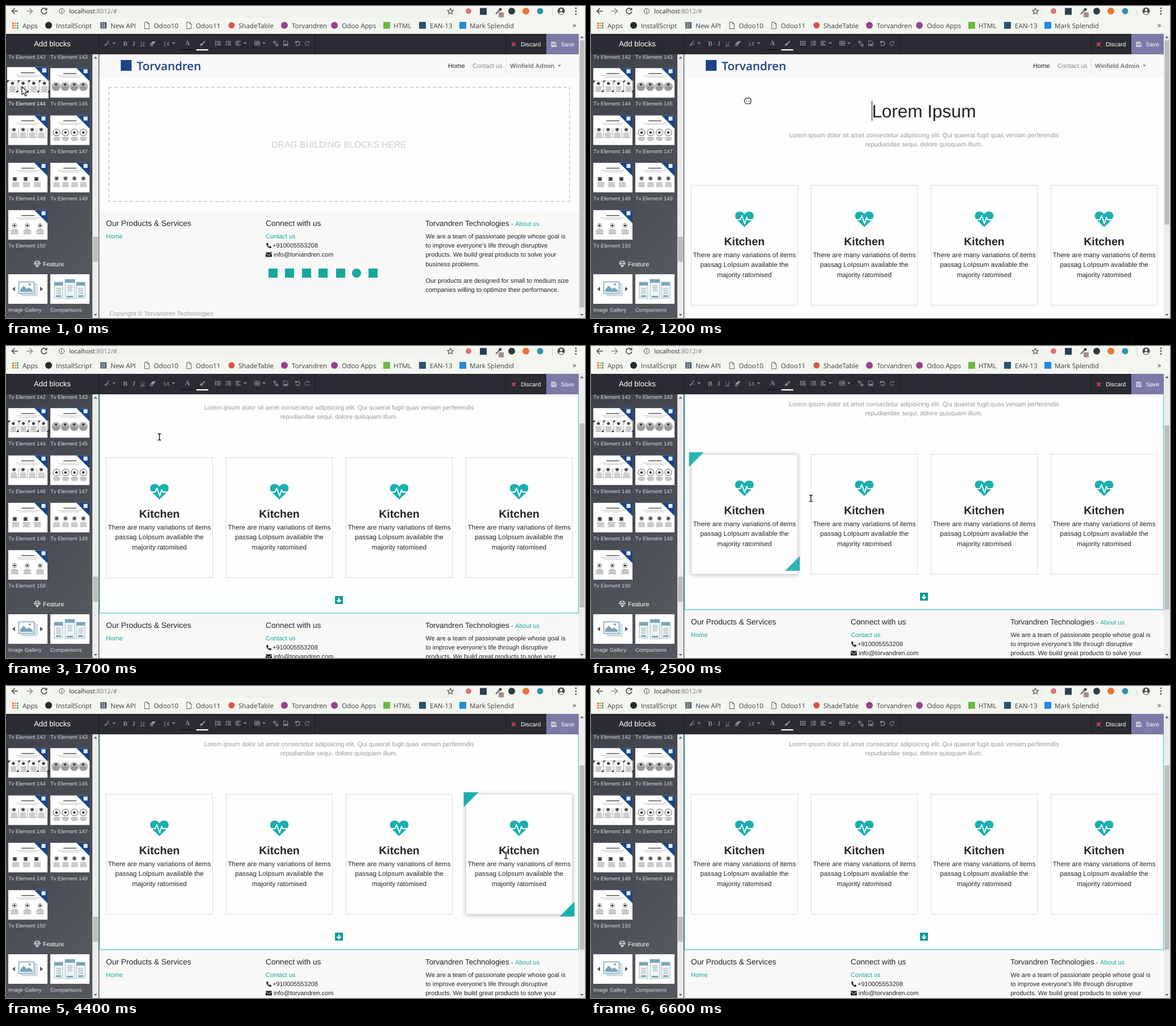
These frames come from a looping animation (1019 by 549 pixels, 6.8 s). An HTML page:

```html
<!DOCTYPE html>
<html lang="en">
<head>
<meta charset="utf-8">
<title>Website builder</title>
<style>
  html, body { margin: 0; width: 100%; height: 100%; overflow: hidden; background: #fefefe; }
  svg { display: block; }
  text { font-family: "Liberation Sans", Arial, sans-serif; white-space: pre; text-rendering: geometricPrecision; }
  .ui { font-family: "Open Sans", "Noto Sans", sans-serif; }
  .serif { font-family: "Liberation Serif", serif; font-weight: bold; }
  .shadow { filter: drop-shadow(0 1px 4px rgba(0, 0, 0, .3)); }
</style>
</head>
<body>
<svg id="stage" width="1019" height="549" viewBox="0 0 1019 549"></svg>
<script>
const LOOP = 6800, STEP = 100;
const TEAL = '#1cafb1', LINK = '#17a79b', NAVY = '#1b4485', INK = '#212529';
const CARD_X = [176.5, 387.5, 598.5, 809.5];

// Drawing helpers
const rect = (x, y, w, h, fill, more = '') =>
  `<rect x="${x}" y="${y}" width="${w}" height="${h}" fill="${fill}" ${more}/>`;
const dot = (x, y, r, fill, more = '') => `<circle cx="${x}" cy="${y}" r="${r}" fill="${fill}" ${more}/>`;
const shape = (d, fill, more = '') => `<path d="${d}" fill="${fill}" ${more}/>`;
const line = (d, color, w = 1, more = '') =>
  `<path d="${d}" fill="none" stroke="${color}" stroke-width="${w}" ${more}/>`;
const text = (x, y, s, size, fill, more = '') =>
  `<text x="${x}" y="${y}" font-size="${size}" fill="${fill}" ${more}>${s}</text>`;
const mid = 'text-anchor="middle"', bold = 'font-weight="bold"';
const group = (id, body, more = '') => `<g id="${id}" ${more}>${body}</g>`;
const caret = (x, y, fill, s = 3) => shape(`M${x - s} ${y}h${2 * s}l${-s} ${s}z`, fill);
const bars = (x, y, widths, gap, color, w = 1) =>
  widths.map((n, i) => line(`M${x - n / 2} ${y + i * gap}h${n}`, color, w)).join('');

function browser() {
  const g = '#4b4e52';
  let s = rect(0, 0, 1019, 49, '#f3f5ef') + rect(84, -10, 713, 31, '#f0f3ed', 'rx="14"');
  s += line('M21 9H11M15.5 4L10.5 9l5 5', g, 1.7) + line('M36 9h10M41.5 4l5 5l-5 5', '#8d9093', 1.7);
  s += line('M71 6a5 5 0 1 0 .8 4', g, 1.7) + shape('M72.5 2.5v5h-5z', g);
  s += dot(98, 9, 4.6, 'none', `stroke="${g}"`) + line('M98 8.5v3M98 6v1.3', g, 1.2);
  s += text(111, 13, 'localhost<tspan fill="#777b7f">:8012/#</tspan>', 10.9, '#2a2d30', 'class="ui"');
  s += line('M782 4l1.6 3.4l3.7.4l-2.8 2.5l.8 3.7l-3.3-1.9l-3.3 1.9l.8-3.7l-2.8-2.5l3.7-.4z', g, 1.1);
  s += dot(814, 9, 5, '#d9747a') + rect(834, 3.5, 12, 12, '#2c3e55') + line('M862 14l7-7', '#667', 2.4) +
    dot(870, 6, 2.6, '#444') + rect(867, 11, 9, 9, '#a58d8d', 'rx="1.5"') +
    dot(890, 9, 6, '#2f3b3e') + dot(915, 9, 6, '#ea7430') + dot(940, 9, 5.5, '#2f8fb0');
  s += line('M961.5 2v15', '#d3d5d5') + dot(977, 9, 6.5, g) + dot(977, 7, 2.2, '#f4f5f3') +
    shape('M972.5 12.5q4.5-4 9 0q-4.5 4-9 0z', '#f4f5f3');
  s += [4, 9, 14].map(y => dot(1003, y, 1.4, g)).join('');
  for (let i = 0; i < 9; i++)
    s += rect(11 + i % 3 * 4, 29 + Math.floor(i / 3) * 4, 2.7, 2.7, ['#e2574c', '#e0a52e', '#3c9d5b'][i % 3]);
  const file = x => line(`M${x} 28.5h5l3 3v8.5h-8zM${x + 5} 28.5v3h3`, '#5c6064');
  s += dot(75, 34, 6, '#24292e') + rect(166, 28.5, 11, 11, '#50606c') +
    line('M168 31h3M168 34h3M168 37h3M173 30v8', '#e8ecee') + file(244) + file(318) +
    dot(397, 34, 5.5, '#dd5248') + dot(490, 34, 6, '#96428d') + dot(578, 34, 6, '#96428d') +
    rect(664, 28, 12, 12, '#6cb944') + rect(727, 28, 12, 12, '#285270') + rect(798, 28, 12, 12, '#228ae0');
  const marks = [[29, 'Apps'], [88, 'InstallScript'], [184, 'New API'], [260, 'Odoo10'], [334, 'Odoo11'],
    [409, 'ShadeTable'], [503, 'Torvandren'], [591, 'Odoo Apps'], [682, 'HTML'], [746, 'EAN-13'], [816, 'Mark Splendid']];
  s += marks.map(([x, n]) => text(x, 38.5, n, 11.6, '#3c4043', 'class="ui"')).join('');
  return s + text(997, 38, '»', 13, '#3c4043', 'class="ui"');
}

function toolbar() {
  const c = '#8d8d93';
  let s = rect(0, 49, 1008, 36, '#2b2b33') + line('M163.5 49v36M543.5 49v36M880.5 49v36', '#1d1d24');
  s += text(81.5, 71, 'Add blocks', 13.3, '#fff', mid);
  s += line('M174 70l5-5', c, 2) + line('M180 61v3M178.5 62.5h3M182 66v2.5', c);
  s += [190, 295, 421, 454].map(x => caret(x, 64, c)).join('');
  s += text(206, 69.5, 'B', 11.5, c, 'class="serif"') + text(223, 69.5, 'I', 11.5, c, 'class="serif" font-style="italic"') +
    text(237, 69, 'U', 9.5, c) + line('M236 70.5h8', c);
  s += shape('M253 68l5-6h6l-5 6zM253 69h6l-1 1.5h-5z', c) + text(276.5, 69.5, '14', 10, c);
  s += text(315, 69, 'A', 12, c, 'class="serif"') + rect(309, 76, 20, 2, '#18181d');
  s += line('M346 66l4-4', c, 2) + shape('M341 69.5q1-4 4-4l2 2q-1 3-6 2z', c) + rect(335, 76, 21, 2.3, '#fff');
  for (const y of [62.5, 65.5, 68.5]) {
    s += rect(368, y - 1, 2, 2, c) + line(`M371 ${y}h7M390 ${y}h6`, c, 1.6) + line(`M387 ${y}h1.5`, c, 2);
    s += line(`M404 ${y}h${y === 65.5 ? 6 : 9}`, c, 1.6);
  }
  s += line('M437.5 62h9v7h-9zM437.5 65.5h9M440.5 62v7M443.5 62v7', c);
  s += line('M473 66l-2-2a1.5 1.5 0 0 1 2-2l3 3M476 66l2.5 2a1.5 1.5 0 0 1-2 2l-3-3', c, 1.5);
  s += line('M488.5 61.5h5l2.5 2.5v6h-7.5z', c) + shape('M489 69l2-3l1.5 1.5l1.5-2l1.5 3.5z', c);
  s += line('M510.5 63.5a3.6 3.6 0 1 1-.5 4', c, 1.4) + shape('M509 61v4h4z', c);
  s += line('M532.5 63.5a3.6 3.6 0 1 0 .5 4', '#66666d', 1.4) + shape('M534 61v4h-4z', '#66666d');
  s += line('M890.5 64.5l6 6M896.5 64.5l-6 6', '#d6405a', 2.3) + text(906, 71, 'Discard', 10.4, '#fff');
  s += rect(951, 49, 57, 36, '#7b7aa8') + line('M960 63.5h6l2 2v6h-8zM962 63.5v2.5h3.5v-2.5M962 71.5v-3h4v3', '#fff');
  return s + text(976.5, 71, 'Save', 10.3, '#fff');
}

// Miniature layouts, relative to the thumbnail corner
const icons = {
  card: x => line(`M${x - 8} 22.5h16v19h-16z`, '#c4c4c4') + dot(x, 27, 2.6, '#444') +
    shape(`M${x - 9} 22h4l-4 4zM${x + 9} 42h-4l4-4z`, '#222') + bars(x, 33, [11, 9, 12, 8], 2.3, '#888'),
  disc: x => dot(x, 32.5, 8, '#b5b5b5') + dot(x, 29, 2, '#333') + bars(x, 33.5, [11, 12, 9], 2.2, '#777'),
  box: x => line(`M${x - 7.5} 23.5h15v16h-15z`, '#d2d2d2') + dot(x, 25, 3.2, '#777') + dot(x, 25, 1.3, '#222') +
    bars(x, 31, [9, 12, 10, 12], 2.4, '#888'),
  ring: x => dot(x, 30, 6, '#fff', 'stroke="#555"') + dot(x, 30, 2.2, '#222') + bars(x, 39, [11, 13, 9], 2.3, '#777'),
  square: x => rect(x - 4, 25, 7, 7, '#666') + rect(x - 2, 27, 3, 3, '#222') + bars(x + 1, 35, [12, 13, 11, 13], 2.3, '#888'),
  blur: x => dot(x, 27.5, 4, '#aaa') + rect(x - 2, 25.5, 4, 4, '#444') + bars(x, 35, [10, 12, 11, 12], 2.3, '#888'),
  eye: x => dot(x, 27, 3.8, '#fff', 'stroke="#888"') + dot(x, 27, 1.8, '#111') + bars(x, 34, [9, 14, 12, 14], 2.5, '#777')
};
const kinds = [['card', 9, 17.7, 4], ['disc', 10, 16, 4], ['box', 10, 16, 4], ['ring', 11, 15.7, 4],
  ['square', 12, 19, 3], ['blur', 11, 15.7, 4], ['eye', 11, 22.5, 3]];

function thumb(i) {
  const [kind, x0, gap, n] = kinds[i];
  let s = rect(0, 0, 69, 52, '#fff') + bars(34.5, 9.5, [23], 0, '#555', 1.5) + bars(34.5, 13.5, [42, 32], 2.5, '#c2c2c2');
  for (let k = 0; k < n; k++) s += icons[kind](x0 + gap * k);
  return s + shape('M46 0h23v23z', NAVY) + rect(58.5, 2, 7, 7, '#e4ebf5');
}

function scrollbar(x, y, w) {
  const c = x + w / 2;
  return rect(x, y, w, 549 - y, '#ececec') + shape(`M${c - 3} ${y + 7.5}h6l-3-3.5z`, '#555') + caret(c, 542, '#555');
}

function sidebar() {
  let s = rect(0, 85, 152, 464, 'url(#side)');
  const label = (x, y, n, id = '') => text(x, y, n, 9.4, '#d8d9db', id && `id="${id}"`);
  s += label(4, 92.5, 'Tv Element 142') + label(78, 92.5, 'Tv Element 143');
  kinds.forEach((k, i) => {
    const x = 4 + i % 2 * 74, y = 109.3 + Math.floor(i / 2) * 83.3;
    s += group('thumb' + i, thumb(i), `transform="translate(${x} ${y})"`);
    s += label(x, y + 66, 'Tv Element ' + (144 + i), 'label' + i);
  });
  s += line('M49.5 453l2.5-4h6l2.5 4l-5.5 6.5zM49.5 453h11M52 449l3 10.5l3-10.5', '#eee') + text(65, 458, 'Feature', 10.8, '#fff');
  s += rect(4, 472, 69, 52, '#fff') + shape('M16 494v8l-5-4zM60 494v8l5-4z', '#555') +
    rect(29, 490, 26, 20, '#eef4f7', 'stroke="#a9c2ce"') + rect(26, 488, 26, 20, '#eef4f7', 'stroke="#a9c2ce"') +
    rect(22.5, 485.5, 27, 20, '#fff', 'stroke="#7aa5b8" stroke-width="1.5"') +
    shape('M25 503v-4l6-7l6 6l3-3l7 5v3z', '#7aa5b8') + dot(42, 490, 2, '#7aa5b8');
  s += rect(78, 472, 69, 52, '#fff');
  for (const [x, y, w, h] of [[85, 486, 15, 28], [124, 486, 15, 28], [104, 481, 17, 34]])
    s += rect(x, y, w, h, '#f0f5f7', 'stroke="#9bb7c4"') + rect(x, y, w, 6, '#7aa5b8') +
      bars(x + w / 2, y + 11, [9, 9, 7, 9], 3, '#8fa3ad') + rect(x + 3, y + h - 5, w - 6, 3, '#7aa5b8');
  s += label(4, 538, 'Image Gallery') + label(78, 538, 'Comparisons');
  return s + scrollbar(152, 85, 11) + rect(153, 406, 9, 44, '#bdbdbd') + line('M163.5 85v464', '#2b2b33');
}

function header() {
  return rect(164, 85, 844, 41, '#f8f8f7') + rect(202, 95, 19, 19, NAVY) +
    text(230, 112.5, 'Torvandren', 20.5, NAVY, 'class="ui" font-weight="600"') +
    text(778, 109, 'Home', 11.1, INK) + text(821, 109, 'Contact us', 11, '#8b8c8c') + line('M880.5 92v26', '#e2e2e2') +
    text(887, 109, 'Winfield Admin', 10.8, '#77797b', bold) + caret(974, 103.5, '#77797b', 3);
}

function footer() {
  let s = rect(164, 361, 844, 300, '#f8f8f7');
  s += text(176, 386.5, 'Our Products &amp; Services', 13.7, INK) + text(457, 386.5, 'Connect with us', 13.7, INK) +
    text(738, 386.5, 'Torvandren Technologies', 13.3, INK) + text(889, 386.5, '-', 11, INK) + text(896, 386.5, 'About us', 10.9, LINK);
  s += text(176, 408.5, 'Home', 11, LINK) + text(457, 408.5, 'Contact us', 11, LINK);
  s += text(469, 425, '+910005553208', 11, INK) + text(471, 441, 'info@torvandren.com', 11, INK);
  s += shape('M458 418l2-1.5l2 3l-1.2 1.2q1 2 2.7 2.8l1.2-1.2l2.8 1.7q-.8 2.5-2.8 2.3q-6-1.8-6.7-8.3z', INK);
  s += rect(457, 433.5, 11, 8, INK) + line('M457 435l5.5 4l5.5-4', '#f8f8f7');
  const copy = ['We are a team of passionate people whose goal is', 'to improve everyone\'s life through disruptive',
    'products. We build great products to solve your', 'business problems.', '',
    'Our products are designed for small to medium size', 'companies willing to optimize their performance.'];
  copy.forEach((n, i) => s += text(738.5, 408.5 + 16.4 * i - (i > 4 ? 3.5 : 0), n, 11, INK));
  [470, 499, 529, 558, 589, 617, 646].forEach((x, i) =>
    s += i === 5 ? dot(x, 470, 8, LINK) : rect(x - 8, 462, 16, 16, LINK));
  return s + text(182, 545, 'Copyright © Torvandren Technologies', 11, '#a0a2a4');
}

function placeholder() {
  return rect(181, 143, 811, 201, 'none', 'stroke="#c6c6c6" stroke-width="1.6" stroke-dasharray="6 4"') +
    text(586, 249, 'DRAG BUILDING BLOCKS HERE', 15.5, '#c9cccf', mid);
}

function card(x, i) {
  const c = x + 93.5;
  return group('shadow' + i, rect(x, 315.5, 187, 211, '#fff', 'class="shadow"')) +
    rect(x, 315.5, 187, 211, '#fefefe', 'stroke="#dcdcdc"') +
    `<g transform="translate(${c} 375)">` +
    shape('M0 14L-13 1.5C-19-5-16.5-13.3-8-13.3C-4-13.3-1.5-11 0-8.5C1.5-11 4-13.3 8-13.3C16.5-13.3 19-5 13 1.5Z', TEAL) +
    line('M-17 1H-7.5L-4.5-6L.5 8L4-3L6 1H17', '#fff', 1.9, 'stroke-linejoin="round"') + '</g>' +
    text(c, 421, 'Kitchen', 19.5, INK, `${mid} ${bold}`) +
    ['There are many variations of items', 'passag LoIpsum available the', 'majority ratomised']
      .map((n, k) => text(c, 442 + k * 17.3, n, 11.78, INK, mid)).join('') +
    group('tip' + i, shape(`M${x - 4} 312h26l-26 26z`, TEAL) + group('tail' + i, shape(`M${x + 191} 530.5h-26l26-26z`, TEAL)));
}

function handle(y) {
  return rect(579, y - 7, 14, 14, '#10999a') + line(`M586 ${y - 4}v7M582.5 ${y}l3.5 3.5l3.5-3.5`, '#fff', 2);
}

function block() {
  let s = group('padTop', rect(164, 126, 844, 41, '#cfffff')) + group('padBottom', rect(164, 549, 844, 40, '#effffc'));
  s += text(586, 195.8, 'Lorem Ipsum', 31.4, INK, mid) + group('caret', rect(494, 167, 1, 35, '#111'));
  s += text(586, 231, 'Lorem ipsum dolor sit amet consectetur adipisicing elit. Qui quaerat fugit quas veniam perferendis', 11, '#979899', mid) +
    text(586, 247.4, 'repudiandae sequi, dolore quisquam illum.', 11, '#979899', mid);
  s += CARD_X.map(card).join('');
  return s + group('frame', rect(164.5, 126.5, 843, 462.5, 'none', 'stroke="#4cc9c9" stroke-width="1.3"') + handle(150) + handle(566));
}

const pointers = {
  arrow: shape('M0 0v14l3.4-3l2.3 5.5l2.3-1l-2.3-5.3h4.5z', '#fff', 'stroke="#222" stroke-width="1.2"'),
  hand: shape('M-6 0q-1-3 2-3q1-3 3-1.5q2-1.5 3.5.3q3-.7 3 2.2v3q0 4-3.5 4h-5q-2 0-3-5z', '#fff', 'stroke="#222" stroke-width="1.2"') +
    line('M-2.5-.5v1.5M0-.5v1.5M2.5-.5v1.5', '#222'),
  beam: ['#fff', '#222'].map((c, i) => line('M-3-5.5h2l1 1l1-1h2M-3 5.5h2l1-1l1 1h2M0-5v10', c, i ? 1.5 : 3.2)).join('')
};

document.getElementById('stage').innerHTML =
  `<defs><linearGradient id="side" x1="0" x2=".4" y1="0" y2="1"><stop stop-color="#3f4249"/><stop offset=".6" stop-color="#4a4d54"/><stop offset="1" stop-color="#54575d"/></linearGradient></defs>` +
  rect(164, 85, 844, 464, '#fefefe') +
  '<svg x="164" y="85" width="844" height="464" viewBox="164 85 844 464">' +
  group('page', header() + group('empty', placeholder()) + group('footer', footer()) + group('block', block())) + '</svg>' +
  sidebar() + browser() + toolbar() + scrollbar(1008, 49, 11) + rect(1009.5, 60, 8.5, 470, '#bdbdbd', 'id="bar"') +
  group('drag', thumb(0), 'opacity=".85"') +
  Object.keys(pointers).map(k => group(k, pointers[k])).join('');

// Steps: [time, value...]
const scrollSteps = [[0, 0], [1300, 4], [1400, 24], [1500, 60], [1600, 98], [1700, 119], [1800, 125]];
const flashSteps = [[0, 0], [1300, .4], [1400, .8], [1500, 1], [1600, .6], [1700, .2], [1800, 0]];
const pointerSteps = [
  [0, 28, 142, 'arrow'], [100, 34, 149, 'hand'], [200, 78, 156, 'hand'], [300, 134, 163, 'hand'],
  [500, 170, 169, 'hand'], [600, 205, 171, 'hand'], [700, 235, 171, 'hand'], [800, 258, 170, 'hand'],
  [900, 270, 168, 'hand'], [1000, 276, 167, 'hand'], [1300, 274, 164, 'beam'], [1400, 271, 161, 'beam'],
  [1500, 270, 160, 'beam'], [1800, 270, 164, 'beam'], [1900, 271, 235, 'beam'], [2000, 274, 288, 'beam'],
  [2400, 325, 276, 'beam'], [2500, 387, 268, 'beam'], [2600, 440, 285, 'beam'], [2700, 462, 298, 'beam'],
  [2800, 470, 305, 'beam'], [3200, 545, 311, 'beam'], [3300, 625, 311, 'beam'], [3400, 669, 310, 'beam'],
  [4000, 710, 304, 'beam'], [4100, 785, 300, 'beam'], [4200, 842, 299, 'beam'], [4300, 870, 298, 'beam'],
  [4400, 880, 298, 'beam'], [4900, 895, 262, 'beam'], [5000, 915, 178, 'beam'], [5100, 932, 98, 'beam'],
  [5200, 945, 30, 'arrow'], [5300, 0, 0, '']
];
const hoverSteps = [
  [[0, 0], [1900, .6], [2000, 1], [2500, .92], [2600, .4], [2700, 0]],
  [[0, 0], [2600, .5], [2700, .85], [2800, 1], [3200, .9], [3300, .4], [3400, 0]],
  [[0, 0], [3300, .6], [3400, 1], [4100, .7], [4200, .3], [4300, 0]],
  [[0, 0], [4200, .5], [4300, .85], [4400, 1], [5000, .85], [5100, .4], [5200, 0]]
];
const at = (steps, t) => steps.reduce((last, s) => s[0] <= t ? s : last).slice(1);
const $ = id => document.getElementById(id);
const move = (id, x, y, more = '') => $(id).setAttribute('transform', `translate(${x} ${y}) ${more}`);
const show = (id, on) => $(id).style.opacity = +on;

function draw(time) {
  const t = Math.floor(time / STEP) * STEP;
  const dropped = t >= 500, [scroll] = at(scrollSteps, t), [x, y, kind] = at(pointerSteps, t);
  move('page', 0, -scroll);
  move('footer', 0, dropped ? 228 : 0);
  show('empty', !dropped);
  show('block', dropped);
  show('caret', t >= 1200);
  show('frame', t >= 1300);
  const [flash] = at(flashSteps, t);
  show('padTop', flash);
  show('padBottom', flash);
  $('bar').setAttribute('y', 60.5 + scroll * .635);
  $('bar').setAttribute('height', dropped ? 324 : 470);
  const over = t < 100;
  move('thumb0', over ? 2 : 4, over ? 107.5 : 109.3, `scale(${over ? 1.055 : 1})`);
  $('label0').setAttribute('fill', over ? '#fff' : '#d8d9db');
  show('drag', t >= 100 && t < 1000);
  move('drag', x - 26, y - 39);
  for (const k in pointers) {
    show(k, k === kind);
    move(k, x, y);
  }
  hoverSteps.forEach((steps, i) => {
    const [p] = at(steps, t);
    show('shadow' + i, p);
    show('tip' + i, p);
    move('tail' + i, 0, p < 1 ? -10 : 0);
  });
}

const start = performance.now();
function tick() {
  draw((performance.now() - start) % LOOP);
  requestAnimationFrame(tick);
}
tick();
</script>
</body>
</html>
```
